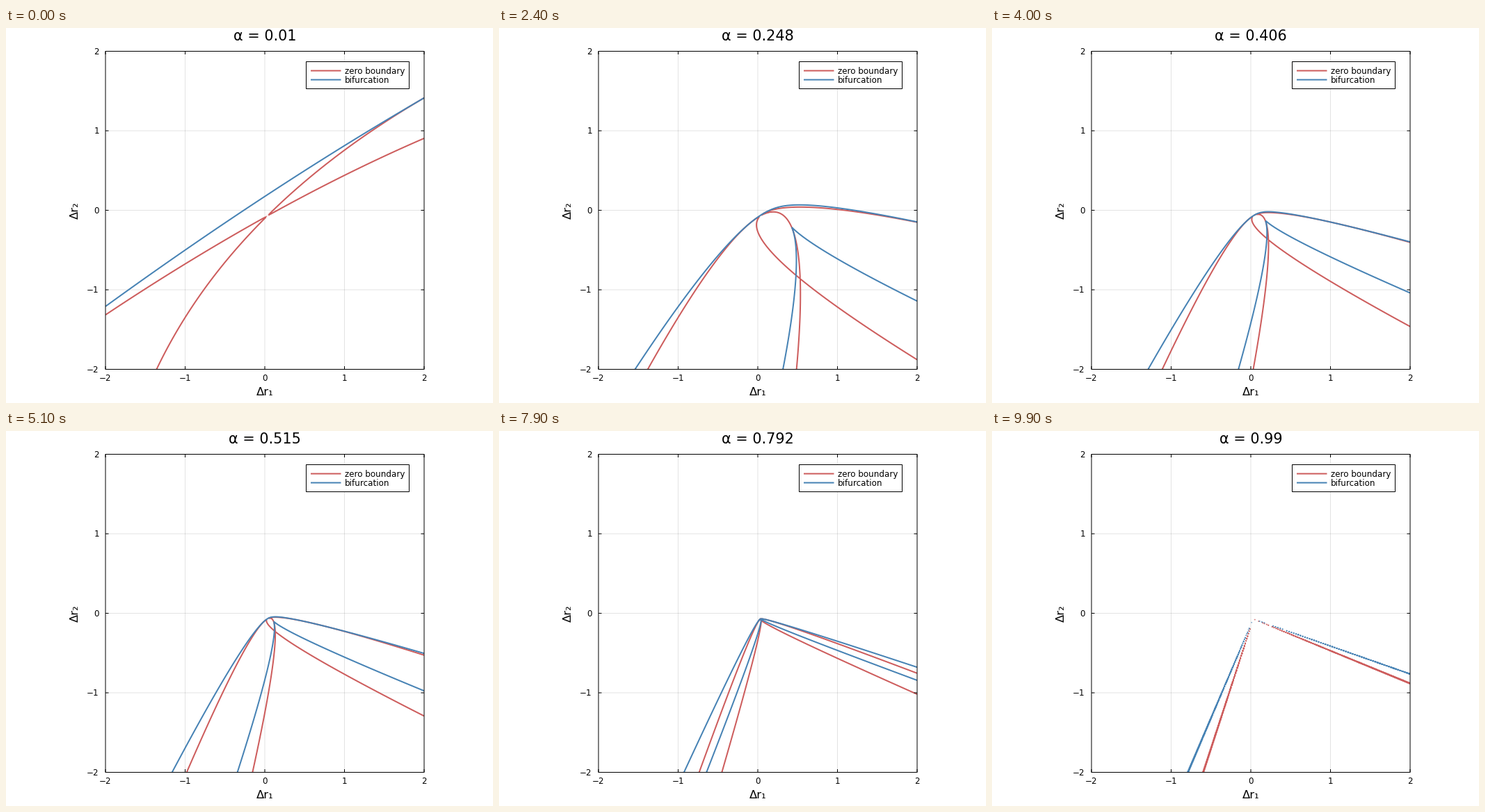
Write a matplotlib script that moves like this. It is 700 px wide and 540 px high and loops after 10 s.

```python
import numpy as np
import matplotlib.pyplot as plt
from matplotlib.animation import FuncAnimation
from matplotlib.patches import Rectangle
from numpy.polynomial import polynomial as P

plt.rcParams["font.family"] = "DejaVu Sans"

W, H, DPI = 700, 540, 100
FRAMES, INTERVAL = 100, 100
RED, BLUE = "#cd5c5c", "#4682b4"
LEFT, RIGHT, TOP, BOTTOM = 143, 601, 33.5, 491.5
MID_X, MID_Y = (LEFT + RIGHT) / 2, (TOP + BOTTOM) / 2
UNIT = (RIGHT - LEFT) / 4

# Growth rates as a quadratic map of two abundances x, y:
#   r = R0 + (1 - alpha) (A1 x + A2 y) + alpha (B1 x^2 + B2 y^2 + C xy)
# with C = GAMMA B1 + DELTA B2.
R0 = np.array([0.0305, -0.0715])
B1, B2 = np.array([-0.3256, -1.0]), np.array([1.0, -0.4119])
A1, A2 = np.array([0.536, 0.298]), np.array([0.287, 0.2843])
GAMMA, DELTA = 0.50, -0.625

to_basis = np.linalg.inv(np.column_stack([B1, B2]))
(p1, p2), (q1, q2) = to_basis @ A1, to_basis @ A2

axis = np.linspace(-2, 2, 401)
X, Y = np.meshgrid(axis, axis)
U = to_basis[0, 0] * (X - R0[0]) + to_basis[0, 1] * (Y - R0[1])
V = to_basis[1, 0] * (X - R0[0]) + to_basis[1, 1] * (Y - R0[1])

# Pencil of the two equilibrium conics, det = k T + (u + v z) S
h = np.array([GAMMA, DELTA]) / 2
g = np.array([p1, p2]) / 2
f = np.array([q1, q2]) / 2
S = P.polysub(P.polymul(h, h), [0, 1])
T = P.polysub(2 * P.polymul(P.polymul(f, g), h), P.polymul(f, f))
T = P.polysub(T, P.polymul([0, 1], P.polymul(g, g)))


def zero_boundary(k):
    """Vanishes where an equilibrium has x = 0 or y = 0."""
    no_y = k * p2 * (p2 * U - p1 * V) - V * V
    no_x = k * q1 * (q1 * V - q2 * U) - U * U
    return no_y * no_x


def bifurcation(k):
    """Vanishes where two equilibria merge."""
    d = k * T[0] + U * S[0]
    c = k * T[1] + U * S[1] + V * S[0]
    b = k * T[2] + U * S[2] + V * S[1]
    a = k * T[3] + V * S[2]
    ad, bc, bb, cc = a * d, b * c, b * b, c * c
    return 18 * ad * bc - 4 * bb * b * d + bc * bc - 4 * a * c * cc - 27 * ad * ad


def px(n):
    return n * 72 / DPI


fig = plt.figure(figsize=(W / DPI, H / DPI), dpi=DPI, facecolor="white")


def full_axes(z):
    ax = fig.add_axes([0, 0, 1, 1], zorder=z)
    ax.set(xlim=(0, W), ylim=(H, 0))
    ax.axis("off")
    return ax


under, over = full_axes(0), full_axes(2)
plot = fig.add_axes([LEFT / W, 1 - BOTTOM / H,
                     (RIGHT - LEFT) / W, (BOTTOM - TOP) / H], zorder=1)
plot.set(xlim=(-2, 2), ylim=(-2, 2))
plot.axis("off")


def line(ax, xs, ys, color="black", width=1.0, **kw):
    ax.plot(xs, ys, color=color, lw=px(width), solid_capstyle="butt",
            snap=False, **kw)


def label(x, y, s, size, ha="center", **kw):
    return over.text(x, y, s, fontsize=px(size), ha=ha, va="baseline", **kw)


def box(x0, y0, x1, y1, face):
    over.add_patch(Rectangle((x0, y0), x1 - x0, y1 - y0, facecolor=face,
                             edgecolor="black", lw=px(1), snap=False))


TICK = 4.5
for n in range(-2, 3):
    x, y = MID_X + n * UNIT, MID_Y - n * UNIT
    if abs(n) < 2:
        line(under, [x, x], [TOP, BOTTOM], alpha=0.11)
        line(under, [LEFT, RIGHT], [y, y], alpha=0.11)
    for edge, step in ((TOP, TICK), (BOTTOM, -TICK)):
        line(over, [x, x], [edge, edge + step])
    for edge, step in ((LEFT, TICK), (RIGHT, -TICK)):
        line(over, [edge, edge + step], [y, y])
    name = str(n).replace("-", "\u2212")
    label(x, 507.5, name, 11.9)
    label(133.8, y + 4.2, name, 11.9, ha="right")

box(LEFT, TOP, RIGHT, BOTTOM, "none")
box(431.5, 48.5, 579.5, 87.5, "white")
for y, color, name in ((61.5, RED, "zero boundary"), (74.5, BLUE, "bifurcation")):
    line(over, [438, 481.5], [y, y], color, 2)
    label(487, y + 4.4, name, 11.9, ha="left")

label(MID_X, 529, "Δr₁", 16.4)
label(104, MID_Y, "Δr₂", 16.4, rotation=90, rotation_mode="anchor")
title = label(MID_X, 18, "", 20.8)

curves = []


def update(i):
    alpha = 0.01 + 0.98 * i / (FRAMES - 1)
    k = (1 - alpha) ** 2 / alpha
    while curves:
        curves.pop().remove()
    for field, color in ((zero_boundary, RED), (bifurcation, BLUE)):
        curves.append(plot.contour(X, Y, field(k), levels=[0], colors=[color],
                                   linewidths=px(2)))
    title.set_text(f"α = {round(alpha, 3)}")
    return [title]


anim = FuncAnimation(fig, update, frames=FRAMES, interval=INTERVAL,
                     repeat=True, repeat_delay=0, blit=False)
plt.show()
```
